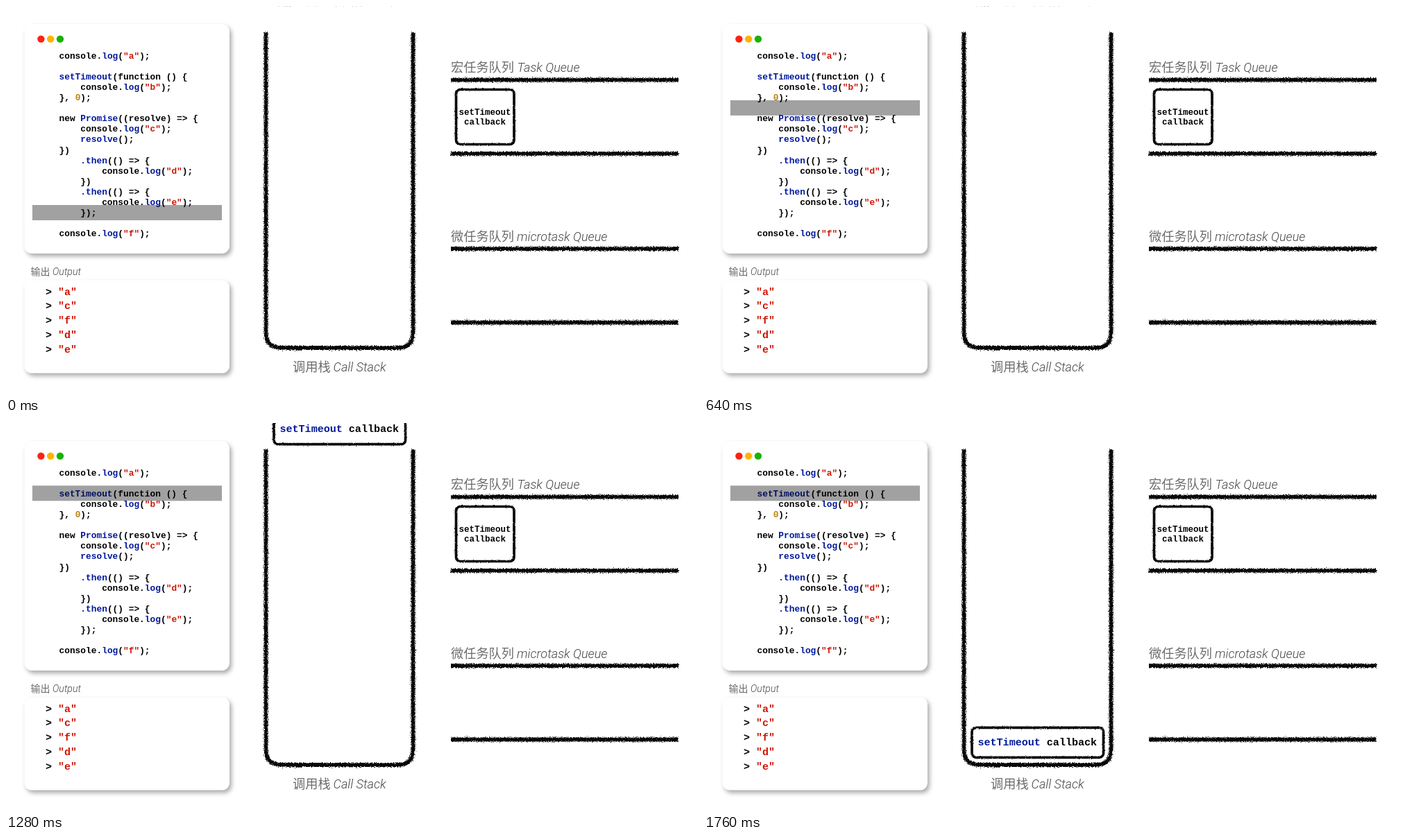
An HTML page for the animation above (2.24 s loop, 997 px wide and 561 px high).

```html
<!DOCTYPE html>
<html lang="zh">
<head>
<meta charset="utf-8">
<title>Call stack and queues</title>
<style>
  html, body { margin: 0; width: 100%; height: 100%; overflow: hidden; background: #fff; }
  svg { display: block; width: 100%; height: 100%; }
  .code { font: bold 12.85px "Liberation Mono", monospace; white-space: pre; }
  .large { font-size: 15.05px; }
  .small { font-size: 12.5px; text-anchor: middle; }
  .name { fill: #00189a; }
  .string { fill: #cf1505; }
  .number { fill: #b8860b; }
  .label { fill: #6c6c6c; font: 300 18.2px "Noto Sans CJK SC", "Noto Sans CJK", sans-serif; }
  .label .latin { fill: #484848; font: italic 300 18.1px Roboto, sans-serif; }
  .label.minor { font-size: 14px; }
  .label.minor .latin { font-size: 14.2px; }
  .card { fill: #fff; filter: drop-shadow(3px 4px 3px rgba(0, 0, 0, .33)); }
  .ink { fill: none; stroke: #080808; stroke-width: 5.8; filter: url(#chalk); }
  .ink.thin { stroke-width: 3.7; filter: url(#pencil); }
</style>
</head>
<body>
<svg viewBox="0 0 997 561">
  <defs>
    <filter id="chalk" filterUnits="userSpaceOnUse" x="360" y="30" width="620" height="480" color-interpolation-filters="sRGB">
      <feTurbulence type="fractalNoise" baseFrequency=".8" numOctaves="2" seed="4"/>
      <feDisplacementMap in="SourceGraphic" scale="5.5" xChannelSelector="R" yChannelSelector="G"/>
    </filter>
    <filter id="pencil" filterUnits="userSpaceOnUse" x="375" y="110" width="370" height="385" color-interpolation-filters="sRGB">
      <feTurbulence type="fractalNoise" baseFrequency=".6" numOctaves="2" seed="9"/>
      <feDisplacementMap in="SourceGraphic" scale="2.5" xChannelSelector="R" yChannelSelector="G"/>
    </filter>
  </defs>

  <rect class="card" x="26.5" y="26" width="295.5" height="331" rx="11"/>
  <rect class="card" x="26.5" y="395.5" width="295.5" height="134" rx="10"/>
  <circle cx="50.4" cy="47.6" r="5.2" fill="#fb2312"/>
  <circle cx="64.2" cy="47.6" r="5.2" fill="#ffb300"/>
  <circle cx="78" cy="47.6" r="5.2" fill="#19b400"/>
  <g id="program"></g>
  <g id="output"></g>
  <rect id="highlight" x="38" width="273" height="22" fill-opacity=".37"/>

  <text class="label minor" x="35.5" y="387.5">输出<tspan class="latin" x="67">Output</tspan></text>
  <text class="label" x="413" y="526.5">调用栈<tspan class="latin" x="471.5">Call Stack</tspan></text>
  <text class="label" x="641" y="95.2">宏任务队列<tspan class="latin" x="736.5">Task Queue</tspan></text>
  <text class="label" x="641" y="338.8">微任务队列<tspan class="latin" x="736">microtask Queue</tspan></text>

  <path class="ink" d="M374.5 38V471Q374.5 493 396.5 493H564.5Q586.5 493 586.5 471V38
    M641 106.7H969M641 212.8H969M641 350.2H969M641 456.5H969"/>

  <rect class="ink thin" x="648.5" y="120.5" width="83.5" height="79" rx="6"/>
  <text class="code small" y="156.6"><tspan x="690">setTimeout</tspan><tspan x="690" dy="14.2">callback</tspan></text>

  <g id="call">
    <rect class="ink thin" x="386" y="439.3" width="189.5" height="43" rx="6"/>
    <text class="code large" x="394.5" y="464.8"><tspan class="name">setTimeout</tspan> callback</text>
  </g>
</svg>
<script>
const LOOP = 2240, STEP = 40;
const byId = id => document.getElementById(id);

const program = `console.log("a");

setTimeout(function () {
    console.log("b");
}, 0);

new Promise((resolve) => {
    console.log("c");
    resolve();
})
    .then(() => {
        console.log("d");
    })
    .then(() => {
        console.log("e");
    });

console.log("f");`;

const colorize = line => line
  .replace(/>/g, "&gt;")
  .replace(/("\w")|(setTimeout|Promise|resolve(?=\(\))|\.then|\blog)|(\b0\b)/g,
    (token, string, name) =>
      `<tspan class="${string ? "string" : name ? "name" : "number"}">${token}</tspan>`);

function writeLines(id, lines, x, y, spacing, style) {
  byId(id).innerHTML = lines.map((line, i) =>
    `<text class="${style}" x="${x}" y="${y + i * spacing}">${colorize(line)}</text>`).join("");
}

// Cubic Bezier easing whose control points sit at (x1, 0) and (x2, 1).
function bezierEase(x1, x2, progress) {
  const x = Math.min(1, Math.max(0, progress));
  let low = 0, high = 1;
  for (let i = 0; i < 30; i++) {
    const s = (low + high) / 2, r = 1 - s;
    if (3 * r * r * s * x1 + 3 * r * s * s * x2 + s ** 3 < x) low = s;
    else high = s;
  }
  return low * low * (3 - 2 * low);
}

function draw(now) {
  const t = Math.floor(now % LOOP / STEP) * STEP;
  const barY = 287 - 196.7 * bezierEase(.42, .58, t / 960);
  const callY = -485 * (1 - bezierEase(0, .58, (t - 1260) / 480));
  byId("highlight").setAttribute("y", barY);
  byId("call").setAttribute("transform", `translate(0 ${callY})`);
}

writeLines("program", program.split("\n"), 76.5, 76, 15.06, "code");
writeLines("output", [..."acfde"].map(letter => `> "${letter}"`), 57, 416.5, 20.75, "code large");

const start = performance.now();
function tick() {
  draw(performance.now() - start);
  requestAnimationFrame(tick);
}
tick();
</script>
</body>
</html>
```
